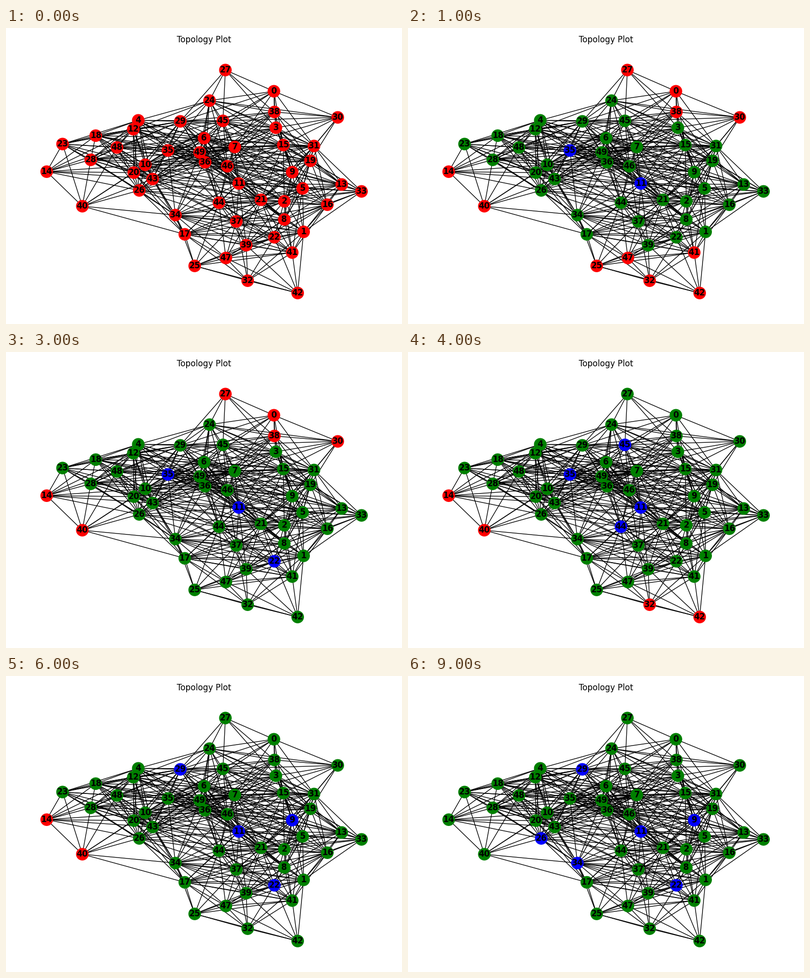
A matplotlib script that plays this animation: 800x600 px, repeating every 9500 ms.

```python
import numpy as np
import matplotlib.pyplot as plt
from itertools import combinations
from matplotlib.animation import FuncAnimation
from matplotlib.collections import LineCollection

W, H, DPI = 800, 600, 100
STEP, FRAMES = 500, 19

# One placed point per numbered node, in pixels with y downwards
NODES = np.array([
    (541, 128), (601, 413), (562, 351), (545, 202), (267, 187),
    (599, 325), (400, 223), (462, 241), (562, 388), (578, 292),
    (281, 277), (470, 315), (257, 205), (678, 317), (82, 291),
    (560, 237), (649, 358), (361, 418), (181, 218), (615, 269),
    (258, 293), (515, 348), (542, 424), (114, 235), (411, 147),
    (381, 482), (269, 329), (443, 85), (171, 267), (352, 189),
    (670, 181), (622, 239), (488, 512), (718, 331), (342, 379),
    (327, 248), (402, 272), (465, 392), (542, 170), (485, 440),
    (154, 361), (578, 455), (589, 537), (296, 306), (430, 354),
    (438, 188), (447, 280), (444, 466), (224, 242), (391, 252),
]) + 0.2

# Radio range: a slightly tilted ellipse, d @ RANGE @ d <= 1
RANGE = np.array([[0.1405, -0.0385], [-0.0385, 0.555]]) / 100 ** 2

# Step number -> nodes that join or leave the dominating set
TOGGLES = {1: [11], 2: [35], 4: [5], 6: [5, 22], 7: [22, 45], 8: [44],
           9: [3], 10: [3, 9], 11: [35, 29], 12: [45, 44, 22],
           13: [9, 36], 15: [36, 34], 16: [26], 18: [9]}

delta = NODES[:, None] - NODES[None]
linked = np.einsum("ijk,kl,ijl->ij", delta, RANGE, delta) <= 1


def chosen_at(step):
    chosen = set()
    for when, nodes in TOGGLES.items():
        if when <= step:
            chosen ^= set(nodes)
    return sorted(chosen)


def colors_at(step):
    chosen = chosen_at(step)
    colors = np.full(len(NODES), "red", dtype=object)
    colors[linked[chosen].any(axis=0)] = "green"
    colors[chosen] = "blue"
    return list(colors)


fig = plt.figure(figsize=(W / DPI, H / DPI), dpi=DPI, facecolor="white")
ax = fig.add_axes([0, 0, 1, 1])
ax.set_xlim(0, W)
ax.set_ylim(H, 0)
ax.axis("off")
plt.rcParams["font.family"] = "DejaVu Sans"

edges = [NODES[[a, b]] for a, b in combinations(range(len(NODES)), 2)
         if linked[a, b]]
ax.add_collection(LineCollection(edges, colors="black", linewidths=1, zorder=1))
dots = ax.scatter(*NODES.T, s=300, c="red", linewidths=1, zorder=2)
for i, (x, y) in enumerate(NODES):
    ax.text(x, y, str(i), size=12, weight="bold", ha="center", va="center",
            zorder=3)
ax.text(W / 2, 29.2, "Topology Plot", size=12, ha="center", va="baseline")


def update(step):
    dots.set_color(colors_at(step))
    return [dots]


anim = FuncAnimation(fig, update, frames=FRAMES, interval=STEP,
                     repeat=True, repeat_delay=0, blit=False)
plt.show()
```
